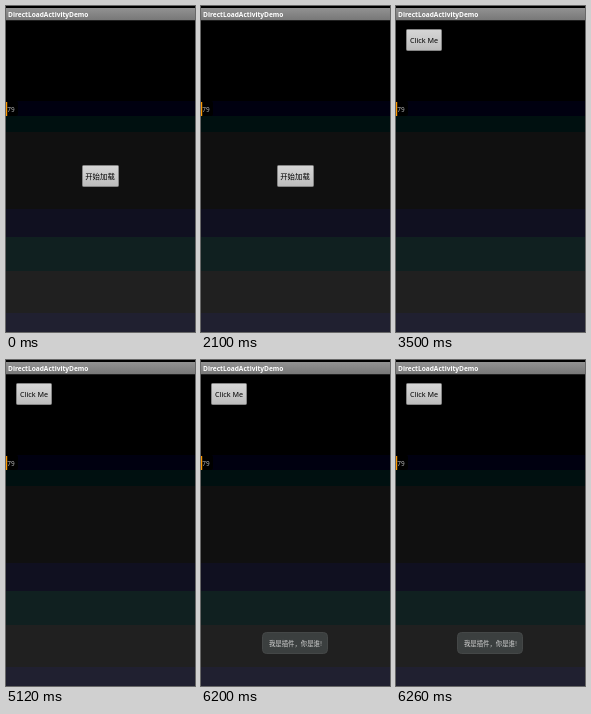
Recreate the animation shown at these times as an HTML page. Size 189x326 px, loop 6.3 s.

```html
<!DOCTYPE html>
<html lang="zh">
<head>
<meta charset="utf-8">
<title>DirectLoadActivityDemo</title>
<style>
  html, body { margin: 0; width: 100%; height: 100%; overflow: hidden; background: #000; }
  svg { display: block; width: 100%; height: 100%; }
  text { font-family: "Noto Sans", "Noto Sans CJK SC", "Noto Sans CJK", sans-serif; }
  .cjk { font-family: "Noto Sans CJK SC", "Noto Sans CJK", sans-serif; }
  .mid { text-anchor: middle; }
</style>
</head>
<body>
<svg viewBox="0 0 189 326" preserveAspectRatio="none">
  <defs>
    <linearGradient id="bar" x2="0" y2="1">
      <stop offset="0" stop-color="#929292"/>
      <stop offset="1" stop-color="#787878"/>
    </linearGradient>
    <linearGradient id="face" x2="0" y2="1">
      <stop offset="0" stop-color="#d6d6d6"/>
      <stop offset=".5" stop-color="#cacaca"/>
      <stop offset="1" stop-color="#bcbcbc"/>
    </linearGradient>
  </defs>
  <g id="bands"></g>

  <rect y="2" width="189" height="12" fill="url(#bar)"/>
  <rect y="14" width="189" height="1" fill="#202020"/>
  <text x="2" y="11" font-size="6.6" font-weight="700" fill="#fff">DirectLoadActivityDemo</text>

  <rect y="95" width="12" height="15" rx="2" fill="#000"/>
  <rect y="96" width="1.2" height="14" fill="#f90"/>
  <text x="1.3" y="105.6" font-size="6.4" fill="#b4b4b4">79</text>

  <g id="load">
    <rect x="76.5" y="159.5" width="36" height="21" rx="1" fill="url(#face)" stroke="#858585"/>
    <text class="cjk mid" x="94" y="172.9" font-size="7.4" font-weight="500" fill="#000">开始加载</text>
  </g>
  <g id="plugin">
    <rect x="10.5" y="23.5" width="35" height="21" rx="1" fill="url(#face)" stroke="#858585"/>
    <text class="mid" x="28" y="37.2" font-size="7.2" font-weight="500" fill="#000">Click Me</text>
  </g>
  <g id="toast">
    <rect x="61.5" y="272.5" width="65" height="21" rx="4" fill="#3b3f3f" stroke="#444747"/>
    <text class="cjk mid" x="94.5" y="285.6" font-size="6.4" fill="#d8d8d8">我是插件，你是谁!</text>
  </g>
</svg>
<script>
  const LOOP = 6300, OPEN = 3500, TOAST = 6200;
  const $ = id => document.getElementById(id);

  // Background steps: top edge and colour
  const bands = [
    [95, '#000010'], [110, '#001010'], [126, '#101010'], [203, '#101020'],
    [231, '#102020'], [265, '#202020'], [307, '#202030']
  ];
  $('bands').innerHTML = bands.map(([y, fill], i) => {
    const end = i + 1 < bands.length ? bands[i + 1][0] : 326;
    return `<rect y="${y}" width="189" height="${end - y}" fill="${fill}"/>`;
  }).join('');

  const show = (id, on) => $(id).setAttribute('visibility', on ? 'visible' : 'hidden');

  function draw(t) {
    show('load', t < OPEN);
    show('plugin', t >= OPEN);
    show('toast', t >= TOAST);
  }

  const start = performance.now();
  function tick() {
    draw((performance.now() - start) % LOOP);
    requestAnimationFrame(tick);
  }
  tick();
</script>
</body>
</html>
```
